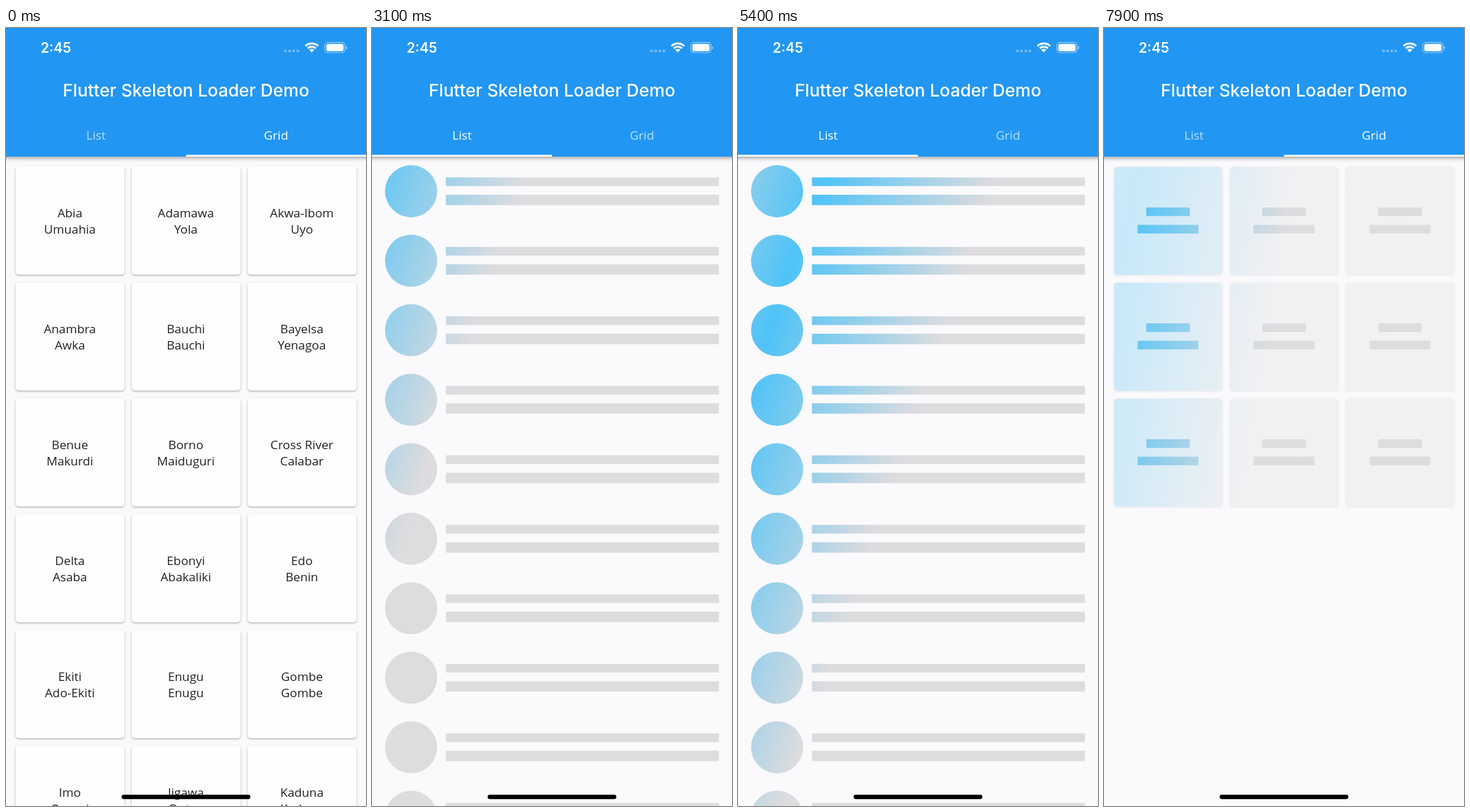
Recreate the animation shown at these times as an HTML page with a canvas. Size 509 px wide and 1101 px high, loop 8000 ms.

```html
<!DOCTYPE html>
<html lang="en">
<head>
<meta charset="utf-8">
<title>Skeleton Loader</title>
<style>
  html, body { margin: 0; width: 100%; height: 100%; overflow: hidden; background: #faf9fb; }
  canvas { display: block; width: 509px; height: 1101px; }
</style>
</head>
<body>
<canvas id="stage" width="509" height="1101"></canvas>
<script>
const ctx = document.getElementById('stage').getContext('2d');
const W = 509, H = 1101, LOOP = 8000, BAR_H = 182;
const BG = '#faf9fb', BLUE = '#2196f3', INK = '#222123', BASE = '#dedcde', GLOW = '#4fc3f7';
const SANS = '"Open Sans", sans-serif', UI = 'Inter, sans-serif';

const STATES = [
  ['Abia', 'Umuahia'], ['Adamawa', 'Yola'], ['Akwa-Ibom', 'Uyo'],
  ['Anambra', 'Awka'], ['Bauchi', 'Bauchi'], ['Bayelsa', 'Yenagoa'],
  ['Benue', 'Makurdi'], ['Borno', 'Maiduguri'], ['Cross River', 'Calabar'],
  ['Delta', 'Asaba'], ['Ebonyi', 'Abakaliki'], ['Edo', 'Benin'],
  ['Ekiti', 'Ado-Ekiti'], ['Enugu', 'Enugu'], ['Gombe', 'Gombe'],
  ['Imo', 'Owerri'], ['Jigawa', 'Dutse'], ['Kaduna', 'Kaduna']
];

// Moments at which the picture is refreshed; it holds in between.
const TICKS = [0, 800, 900, 1000, 1100, 1200, 2100, 2300, 2500, 2800, 3100, 3400, 3700,
  4100, 4500, 5000, 5400, 5800, 5900, 7300, 7400, 7500, 7600, 7700, 7900];
const TO_LIST = 828, LIST_READY = 5850, TO_GRID = 7373;
const SLIDE = 300, PERIOD = 2000;

// cubic-bezier(.25, .1, .25, 1)
function ease(x) {
  if (x <= 0) return 0;
  if (x >= 1) return 1;
  const bez = (s, a, b) => 3 * a * s * (1 - s) ** 2 + 3 * b * s * s * (1 - s) + s ** 3;
  let lo = 0, hi = 1;
  for (let i = 0; i < 24; i++) {
    const mid = (lo + hi) / 2;
    if (bez(mid, .25, .25) < x) lo = mid; else hi = mid;
  }
  return bez(lo, .1, 1);
}

function text(str, x, y, size, color, align = 'left', weight = 400, family = SANS) {
  ctx.font = `${weight} ${size}px ${family}`;
  ctx.textAlign = align;
  ctx.fillStyle = color;
  ctx.fillText(str, x, y);
}

function rounded(x, y, w, h, r) {
  ctx.beginPath();
  ctx.roundRect(x, y, w, h, r);
}

function disc(x, y, r) {
  ctx.beginPath();
  ctx.arc(x, y, r, 0, 2 * Math.PI);
  ctx.fill();
}

function shadow(color, blur, dy) {
  ctx.shadowColor = color;
  ctx.shadowBlur = blur;
  ctx.shadowOffsetY = dy;
}

function noShadow() {
  shadow('transparent', 0, 0);
}

// Highlight band sweeping from left to right over the given box.
function shimmer(x, y, w, h, elapsed) {
  const p = (Math.max(0, elapsed) / PERIOD) % 1;
  const left = x + 2 * w * (p - 1);
  const g = ctx.createLinearGradient(left, y, left + 3 * w, y + h / 2);
  g.addColorStop(.35, BASE);
  g.addColorStop(.5, GLOW);
  g.addColorStop(.65, BASE);
  return g;
}

function eachCell(count, draw) {
  for (let i = 0; i < count; i++) draw(13.7 + (i % 3) * 164, 196 + Math.floor(i / 3) * 164, i);
}

function gridPage() {
  eachCell(18, (x, y, i) => {
    shadow('rgba(0,0,0,.3)', 3, 1.3);
    ctx.fillStyle = '#fefdff';
    rounded(x, y, 154, 153, 4.5);
    ctx.fill();
    noShadow();
    text(STATES[i][0], x + 76.6, y + 71.5, 17.2, INK, 'center');
    text(STATES[i][1], x + 76.6, y + 95, 17.2, INK, 'center');
  });
}

function gridSkeleton(t) {
  const paint = shimmer(14, 196, 482, 482, t - TO_GRID);
  eachCell(9, (x, y) => {
    shadow('rgba(120,120,130,.16)', 3, .6);
    ctx.fillStyle = BG;
    rounded(x + .4, y + .5, 153.2, 153, 4.5);
    ctx.fill();
    noShadow();
    ctx.fillStyle = paint;
    ctx.globalAlpha = .3;
    ctx.fill();
    ctx.globalAlpha = 1;
    ctx.fillRect(x + 46.1, y + 58, 61.5, 12.2);
    ctx.fillRect(x + 33.8, y + 82.6, 86, 12.2);
  });
}

function listPage() {
  for (let i = 0; i < 11; i++) {
    const y = 226 + i * 88.5;
    ctx.fillStyle = '#bbdcfa';
    disc(44.3, y, 24.6);
    text(i + 1, 44, y + 7.3, 19.67, INK, 'center');
    text(STATES[i][0], 88.5, y - 4.8, 19.67, INK);
    text(STATES[i][1], 88.5, y + 19.8, 17.2, '#767577');
  }
}

function listSkeleton(t) {
  ctx.fillStyle = shimmer(6, BAR_H, 497, 1015, t - TO_LIST);
  for (let i = 0; i < 10; i++) {
    const y = 194.2 + i * 98.35;
    disc(55.3, y + 36.8, 36.9);
    ctx.fillRect(104.5, y + 17.2, 386, 12.3);
    ctx.fillRect(104.5, y + 41.8, 386, 14.7);
  }
}

function statusBar() {
  text('2:45', 49, 34.8, 19.4, '#fff', 'left', 600, UI);

  ctx.fillStyle = 'rgba(255,255,255,.35)';
  for (let i = 0; i < 4; i++) disc(395.2 + i * 5.8, 32.5, 2.1);

  const cx = 432.4, cy = 34.6, from = -Math.PI * .75, to = -Math.PI * .25;
  ctx.strokeStyle = ctx.fillStyle = '#fff';
  ctx.lineWidth = 2.7;
  for (const r of [12.7, 8.2]) {
    ctx.beginPath();
    ctx.arc(cx, cy, r, from, to);
    ctx.stroke();
  }
  ctx.beginPath();
  ctx.moveTo(cx, cy);
  ctx.arc(cx, cy, 5, from, to);
  ctx.fill();

  ctx.strokeStyle = 'rgba(255,255,255,.5)';
  ctx.lineWidth = 1.2;
  rounded(450.8, 20.4, 28.6, 14.6, 4.4);
  ctx.stroke();
  rounded(452.9, 22.5, 24.4, 10.4, 2.7);
  ctx.fill();
  ctx.fillStyle = 'rgba(255,255,255,.55)';
  rounded(480.7, 25.4, 1.6, 4.8, [0, 1.6, 1.6, 0]);
  ctx.fill();
}

function appBar(tab) {
  shadow('rgba(0,0,0,.38)', 6, 2);
  ctx.fillStyle = BLUE;
  ctx.fillRect(-10, -10, W + 20, BAR_H + 10);
  noShadow();
  statusBar();
  text('Flutter Skeleton Loader Demo', W / 2, 97, 24.6, '#fff', 'center', 500, UI);
  const label = (str, x, on) => text(str, x, 158.2, 17.2, `rgba(255,255,255,${.7 + .3 * on})`, 'center');
  label('List', W / 4, 1 - tab);
  label('Grid', W * 3 / 4, tab);
  ctx.fillStyle = '#fff';
  ctx.fillRect(tab * W / 2, 179.5, W / 2, 2.5);
}

// Draws a page shifted sideways, skipping it when off stage.
function page(dx, draw) {
  if (Math.abs(dx) >= W) return;
  ctx.save();
  ctx.translate(dx, 0);
  draw();
  ctx.restore();
}

function render(t) {
  // 0 = list tab, 1 = grid tab
  const tab = t < TO_GRID ? 1 - ease((t - TO_LIST) / SLIDE) : ease((t - TO_GRID) / SLIDE);
  ctx.fillStyle = BG;
  ctx.fillRect(0, 0, W, H);
  page(-tab * W, () => t < LIST_READY ? listSkeleton(t) : listPage());
  page((1 - tab) * W, () => t < TO_GRID ? gridPage() : gridSkeleton(t));
  appBar(tab);
  ctx.fillStyle = '#000';
  rounded(163.5, 1085, 182, 6.2, 3.1);
  ctx.fill();
}

const start = performance.now();
function loop() {
  const t = (performance.now() - start) % LOOP;
  render(TICKS.findLast(k => k <= t));
  requestAnimationFrame(loop);
}
loop();
</script>
</body>
</html>
```
